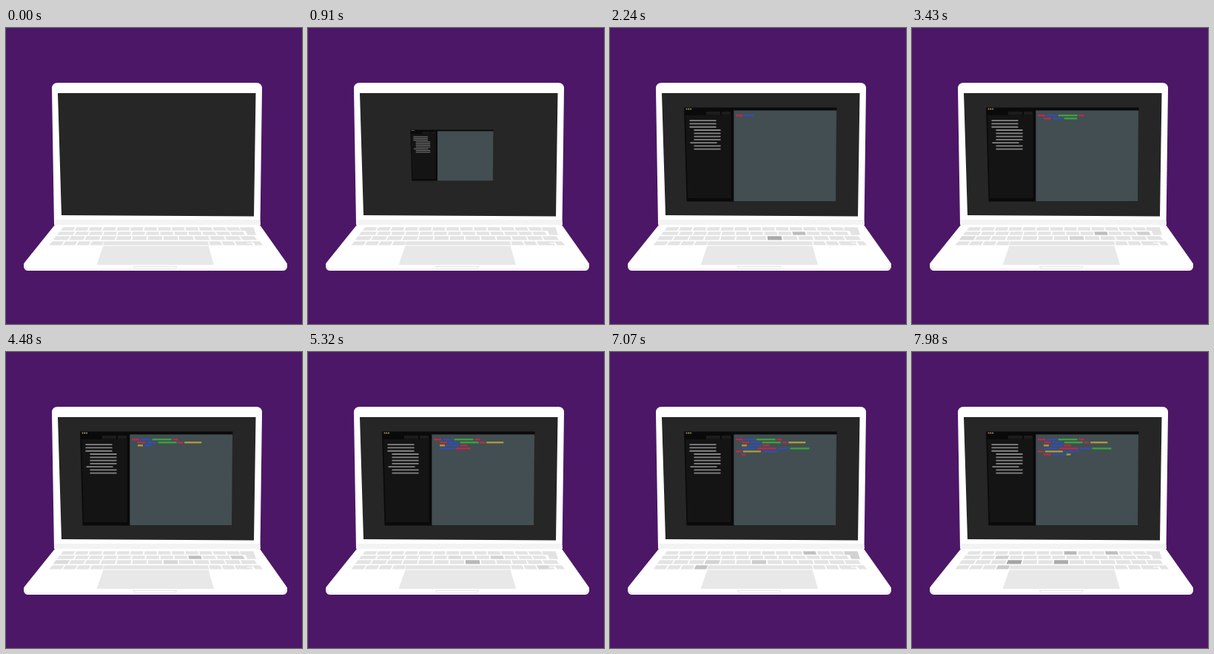
An HTML page for the animation above (8000 ms loop, 400x400 px).

```html
<!DOCTYPE html>
<html>
<head>
<meta charset="utf-8">
<title>Laptop coding</title>
<style>
  html, body { margin: 0; width: 100%; height: 100%; overflow: hidden; background: #4c1766; }
  svg { display: block; width: 100vw; height: 100vh; }
</style>
</head>
<body>
<svg viewBox="0 0 400 400">
  <rect width="400" height="400" fill="#4c1766"/>
  <path fill="#fff" d="M70 74H338Q346 74 346 82L343.5 266H65L62 82Q62 74 70 74Z"/>
  <path fill="#f3f3f3" d="M66 259H343L344 266H65Z"/>
  <path fill="#262626" d="M70 88H337.5L335 254.5L75 253Z"/>
  <path fill="#f2f2f2" d="M24 318H380V323Q379 328 374 328H30Q25 328 24 323Z"/>
  <path fill="#fff" d="M66 266H343L379 317Q381 321 376 322H28Q23 321 25 317Z"/>
  <path fill="#fff" d="M28 321H376V325H28Z"/>
  <path fill="#e8e8e8" d="M131.5 294.5H273.5L281 320H122.500Z"/>
  <path fill="none" stroke="#e6e6e6" d="M172 322.500L175 325.500H228L231 322.500Z"/>
  <g id="keys"></g>
  <g id="win">
    <path fill="#0a0a0a" d="M100 107.500H306.500V111.500H168V234.500H103.500Z"/>
    <path fill="#141414" d="M102 118H163.500V230H105Z"/>
    <path fill="#1c1c1c" d="M130 113H149V117.500H130ZM151 113H163V117.500H151Z"/>
    <path fill="#424e51" d="M167.300 111.500H306L305 234H167.300Z"/>
    <circle cx="103.500" cy="109.500" r="1" fill="#b98a7c"/>
    <circle cx="106.300" cy="109.500" r="1" fill="#c0b04e"/>
    <circle cx="109.100" cy="109.500" r="1" fill="#8fa873"/>
    <g id="list" stroke="#858585" stroke-width="1.800"></g>
    <g id="code" stroke-width="2.300"></g>
  </g>
</svg>
<script>
const $ = id => document.getElementById(id);
const LOOP = 8000, BEAT = 1050, TYPE_START = 1750;
const clamp = v => Math.max(0, Math.min(1, v));

function add(parent, tag, attrs) {
  const el = document.createElementNS('http://www.w3.org/2000/svg', tag);
  for (const k in attrs) el.setAttribute(k, attrs[k]);
  parent.appendChild(el);
  return el;
}

// Keyboard: edges fan out from the middle of the deck
const keys = [];
function key(x0, x1, y0, y1) {
  const at = (x, y) => `${(x + (x - 204) * 0.0052 * (y - (y0 + y1) / 2)).toFixed(1)} ${y}`;
  keys.push(add($('keys'), 'path', {
    d: `M${at(x0, y0)}L${at(x1, y0)}L${at(x1, y1)}L${at(x0, y1)}Z`
  }));
  return keys.length - 1;
}
function row(x, pitch, count, y0, y1) {
  const first = keys.length;
  for (let i = 0; i < count; i++) key(x + i * pitch, x + (i + 1) * pitch - 1.8, y0, y1);
  return first;
}
const r1 = row(75.5, 18.6, 13, 269.3, 273.8);
const enter = keys.length;
keys.push(add($('keys'), 'path', { d: 'M316 269.300H334.500L338 279.700H326L324 274H317.500Z' }));
key(70.5, 92, 275.2, 279.8);
const r2 = row(94, 19.1, 12, 275.2, 279.8);
const r3 = row(65.5, 21.05, 13, 281.3, 286.5);
const r4 = row(60.5, 18.1, 4, 288.2, 293.6);
key(132, 273.5, 288.2, 293.6);
const r5 = row(275, 17.6, 3, 288.2, 293.6);
key(324, 333, 288.2, 290.3);
key(324, 333, 291.3, 293.6);
key(335, 345, 288.2, 293.6);

// Key, moment of its peak in the beat, strength
const presses = [
  [r2 + 11, 120, 0.8], [r3, 160, 0.8], [r2 + 1, 240, 0.7], [r1 + 7, 310, 0.9],
  [r3 + 3, 350, 1], [r3 + 6, 370, 1], [r1 + 10, 420, 0.9], [r4 + 3, 440, 0.7],
  [enter, 630, 1], [r2 + 5, 675, 0.85], [r5 + 2, 710, 0.7],
  [r3 + 7, 900, 1], [r2 + 8, 980, 0.95]
];

// Sidebar lines, each a row with an indent
[0, 0, 0, 6, 6, 6, 6, 1, 6, 6].forEach((dx, i) => {
  const y = 125.2 + i * 4.27;
  add($('list'), 'line', { x1: 107.5 + dx, x2: 143.5 + dx, y1: y, y2: y });
});

const inks = { r: '#bd2950', b: '#2e4fb8', g: '#3aa33c', y: '#b09b39' };
const lines = [
  [170, 'r10 b14 g26 r7'],
  [178, 'r10 b14 g25 r7 y23'],
  [178, 'y7 b17 r10'],
  [178, 'b19 r26 b15 g26'],
  [170, 'r8 y24 b21'],
  [178, 'r10 b17 y6']
];
const bars = [];
lines.forEach(([x, text], i) => {
  const y = 118.2 + i * 4.05;
  for (const part of text.split(' ')) {
    const w = +part.slice(1);
    const el = add($('code'), 'line', { x1: x, x2: x, y1: y, y2: y, stroke: inks[part[0]] });
    bars.push({ el, x, w });
    x += w + 1.8;
  }
});

// Bars typed so far
const pace = [[TYPE_START, 0], [2240, 1.92], [3430, 6.7], [4480, 10.6], [6160, 17], [LOOP, 22]];
function typed(t) {
  for (let i = 1; i < pace.length; i++) {
    const [t0, n0] = pace[i - 1], [t1, n1] = pace[i];
    if (t < t1) return n0 + (n1 - n0) * clamp((t - t0) / (t1 - t0));
  }
  return bars.length;
}

function draw(t) {
  const p = clamp((t - 650) / 500), s = p * p * (3 - 2 * p) * 1.02;
  const scale = Math.min(1, s);
  $('win').setAttribute('transform', `translate(184 173) scale(${scale}) translate(-184 -173)`);
  $('win').setAttribute('visibility', scale > 0 ? 'visible' : 'hidden');

  const n = typed(t);
  bars.forEach((b, i) => {
    const k = clamp(n - i);
    b.el.setAttribute('x2', b.x + b.w * k);
    b.el.setAttribute('visibility', k > 0 ? 'visible' : 'hidden');
  });

  const phase = (t - 280 + BEAT) % BEAT;
  keys.forEach(k => k.setAttribute('fill', '#e3e3e3'));
  if (t < 1500) return;
  for (const [k, peak, power] of presses) {
    const d = Math.abs(phase - peak), gap = Math.min(d, BEAT - d);
    const v = Math.round(227 - 62 * power * clamp(1 - gap / 190));
    keys[k].setAttribute('fill', `rgb(${v},${v},${v})`);
  }
}

const start = performance.now();
function frame() {
  draw((performance.now() - start) % LOOP);
  requestAnimationFrame(frame);
}
frame();
</script>
</body>
</html>
```
